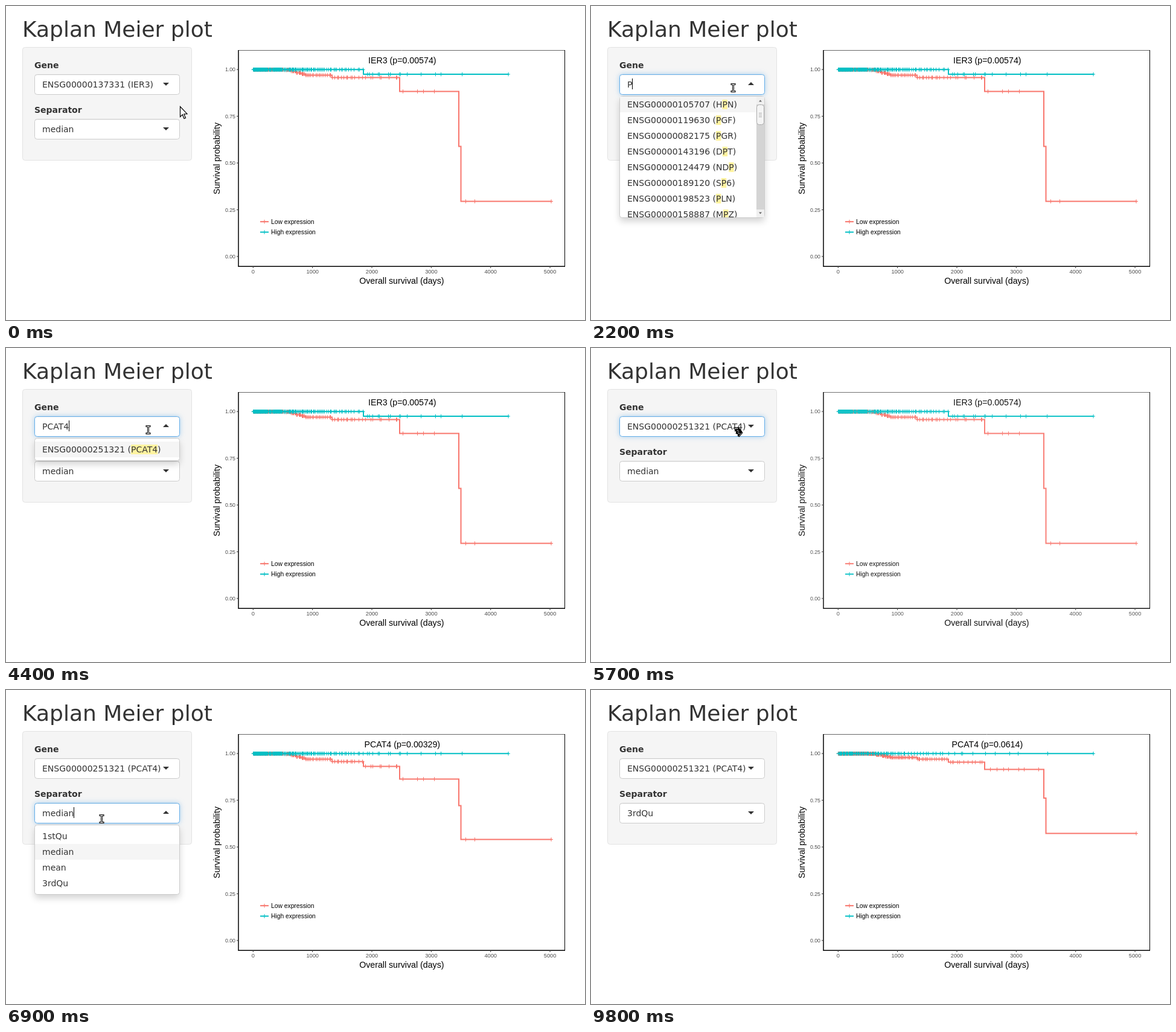
An HTML page with a canvas for the animation above (10 s loop, 959 by 520 pixels).

```html
<!DOCTYPE html>
<html lang="en">
<head>
<meta charset="utf-8">
<title>Kaplan Meier plot</title>
<style>
html, body { margin: 0; width: 100%; height: 100%; overflow: hidden; background: #fff; }
canvas { display: block; }
</style>
</head>
<body>
<canvas id="stage" width="959" height="520"></canvas>
<script>
const c = document.getElementById('stage').getContext('2d');
const UI = '"DejaVu Sans", sans-serif', CHART = '"Liberation Sans", sans-serif';
const RED = '#f8766d', TEAL = '#00bfc4';

const random = n => { const v = Math.sin(n * 12.9898) * 43758.5453; return v - Math.floor(v); };
const smooth = p => { p = Math.min(1, Math.max(0, p)); return p * p * (3 - 2 * p); };

function text(s, x, y, size, color = '#333', family = UI, align = 'left', weight = '') {
  c.font = `${weight} ${size}px ${family}`;
  c.fillStyle = color;
  c.textAlign = align;
  c.fillText(s, x, y);
}
function trace(points) {
  c.beginPath();
  points.forEach(([x, y]) => c.lineTo(x, y));
}
function line(points, color, width = 1, close = false) {
  trace(points);
  if (close) c.closePath();
  c.strokeStyle = color;
  c.lineWidth = width;
  c.stroke();
}
function polygon(points, fill) {
  trace(points);
  c.fillStyle = fill;
  c.fill();
}
function rect(x, y, w, h, fill) {
  c.fillStyle = fill;
  c.fillRect(x, y, w, h);
}
function box(x, y, w, h, fill, border, shadow, blur = 0, drop = 0) {
  c.beginPath();
  c.roundRect(x + .5, y + .5, w - 1, h - 1, 4);
  c.save();
  if (shadow) { c.shadowColor = shadow; c.shadowBlur = blur; c.shadowOffsetY = drop; }
  c.fillStyle = fill;
  c.fill();
  c.restore();
  c.strokeStyle = border;
  c.lineWidth = 1;
  c.stroke();
}

// Survival curves as [x, new y] steps; the low group first sags in small steps of a given depth.
const TOP = 105.3;
const sag = depth => [[460, .05], [472, .2], [481, .4], [488, .55], [496, .7], [540, 1]]
  .map(([x, part]) => [x, TOP + depth * part]);
const plots = [
  {
    title: 'IER3 (p=0.00574)',
    low: { steps: [...sag(13.2), [652, 141.5], [750, 232.5], [753.5, 323.5]], count: 130 },
    high: { steps: [[592, 113]], count: 140 }
  },
  {
    title: 'PCAT4 (p=0.00329)',
    low: { steps: [...sag(13.2), [592, 126.5], [652, 147.5], [750, 191.5], [753.5, 247.5]], count: 130 },
    high: { steps: [], count: 140 }
  },
  {
    title: 'PCAT4 (p=0.0614)',
    low: { steps: [...sag(9.2), [592, 119.5], [652, 131.5], [750, 179], [753.5, 237.5]], count: 180 },
    high: { steps: [], count: 90 }
  }
];

function plus(x, y, color) {
  line([[x - 3, y], [x + 3, y]], color);
  line([[x, y - 3.3], [x, y + 3.3]], color);
}
function curve({ steps, count }, color, end, seed) {
  let y = TOP;
  const path = [[409, y]];
  for (const [x, next] of steps) { path.push([x, y], [x, next]); y = next; }
  path.push([end, y]);
  line(path, color, 2);
  const levelAt = x => steps.reduce((level, s) => x >= s[0] ? s[1] : level, TOP);
  // Marks thin out exponentially with time.
  for (let i = 0; i < count; i++) {
    const x = Math.round(409 - 85 * Math.log(1 - (i + random(seed + i)) / count)) + .5;
    if (x < 780) plus(x, levelAt(x), color);
  }
  plus(end - 1, y, color);
}
function drawPlot({ title, low, high }, fade) {
  curve(low, RED, 904, 1);
  curve(high, TEAL, 833, 400);
  line([[385, 73.5], [926, 73.5]], '#666');
  line([[925.5, 73], [925.5, 431]], '#000');
  line([[385, 73], [385, 431.2], [926, 431.2]], '#000', 1.5);
  for (let i = 0; i < 5; i++) {
    const y = 414.8 - i * 77.4;
    line([[382, y], [385, y]], '#333');
    text((i / 4).toFixed(2), 380, y + 3.2, 8.8, '#4d4d4d', CHART, 'right');
  }
  for (let i = 0; i < 6; i++) {
    const x = 409.3 + i * 98.35;
    line([[x, 431], [x, 434]], '#333');
    text(i * 1000, x, 443, 9.2, '#4d4d4d', CHART, 'center');
  }
  text(title, 656.3, 95, 14.2, '#000', CHART, 'center');
  text('Overall survival (days)', 655.3, 460, 14.2, '#000', CHART, 'center');
  c.save();
  c.translate(354, 252.5);
  c.rotate(-Math.PI / 2);
  text('Survival probability', 0, 0, 14.2, '#000', CHART, 'center');
  c.restore();
  [['Low expression', RED, 357.2], ['High expression', TEAL, 374.5]].forEach(([label, color, y]) => {
    line([[421, y], [435, y]], color, 2);
    plus(428, y, color);
    text(label, 439, y + 3.8, 10.3, '#000', CHART);
  });
  if (fade) rect(340, 70, 600, 400, `rgba(255,255,255,${fade})`);
}

// Genes are written as NAME or NAME:id; a missing id is made up.
const genes = (`IER3:137331 FGR CFH TNMD SCYL3 FUCA2 GCLC NFYA KRIT1
  HPN:105707 PGF:119630 PGR:082175 DPT:143196 NDP:124479 SP6:189120 PLN:198523 MPZ:158887
  PC APC PCNT PCNA PCP4 PCK1 PCM1 PCK2 PCA3 PCAT1 PCAT2 PCAT4:251321 PCAT5 PCAT6 PCAT7 PCAT14 PCAT18`)
  .split(/\s+/).map((entry, i) => {
    const [name, id = 100000 + Math.floor(random(i) * 180000)] = entry.split(':');
    return { name, label: `ENSG00000${id} (${name})` };
  });
const label = name => genes.find(g => g.name === name).label;
const matches = query => genes.filter(g => g.name.includes(query)).slice(0, 8).map(g => g.label);
const separators = ['1stQu', 'median', 'mean', '3rdQu'];

const typed = t => 'PCAT4'.slice(0, t >= 4400 ? 5 : Math.min(4, Math.max(0, Math.floor((t - 1800) / 300))));
const keyTimes = [1100, 1800, 2100, 2400, 2700, 3100, 4400, 6700];
// Pointer moves: [start, end, from x, from y, to x, to y]
const moves = [
  [400, 1000, 288, 166, 235, 135], [5700, 6500, 235, 135, 158, 213],
  [7000, 7700, 158, 213, 120, 319], [8200, 8500, 120, 319, -20, 300]
];

function select(y, value, focus, open, caret) {
  box(47, y, 241, 34, '#fff', focus ? '#66afe9' : '#ccc', focus && 'rgba(102,175,233,.6)', 8);
  rect(49, y + 1, 237, 1, 'rgba(0,0,0,.04)');
  text(value, 60, y + 22, 14);
  if (caret) rect(Math.floor(60 + c.measureText(value).width), y + 7, 1, 18, '#000');
  const base = y + (open ? 18 : 14), tip = y + (open ? 13 : 19);
  polygon([[260, base], [270, base], [265, tip]], '#333');
}
function scrollbar() {
  rect(274, 150, 13, 200, '#d4d4d4');
  rect(274, 150, 13, 13, '#f0f0f0');
  rect(274, 337, 13, 13, '#f0f0f0');
  polygon([[278, 158.5], [283, 158.5], [280.5, 155.5]], '#666');
  polygon([[278, 341.5], [283, 341.5], [280.5, 344.5]], '#666');
  box(274, 163, 13, 34, '#f4f4f4', '#aaa');
  for (let y = 177; y < 185; y += 3) rect(278, y, 5, 1, '#aaa');
}
function dropdown(top, options, active, query) {
  const height = Math.min(200, options.length * 26 + 10), scrolls = height === 200;
  box(47, top, 241, height + 2, '#fff', '#ccc', 'rgba(0,0,0,.175)', 12, 6);
  c.save();
  c.beginPath();
  c.rect(48, top + 1, 239, height);
  c.clip();
  options.forEach((option, i) => {
    const y = top + (scrolls ? 1 : 6) + i * 26;
    if (i === active) rect(48, y, 239, 26, '#f5f5f5');
    if (query) {
      c.font = `14px ${UI}`;
      c.textAlign = 'left';
      const at = option.indexOf(query, option.indexOf('('));
      rect(60 + c.measureText(option.slice(0, at)).width, y + 5, c.measureText(query).width, 16, '#fff3a0');
    }
    text(option, 60, y + 18, 14);
  });
  if (scrolls) scrollbar();
  c.restore();
}

const pointers = {
  arrow() {
    const shape = [[0, 0], [0, 17], [3.8, 13.4], [6.5, 20], [9, 19], [6.3, 12.5], [11.5, 12.2]];
    polygon(shape, '#fff');
    line(shape, '#000', 1.2, true);
  },
  hand() {
    c.translate(0, -4);
    polygon([[0, 1], [2, 0], [9, 0], [13, 4], [16, 9], [10, 16], [7, 14], [8, 12], [4, 10], [5, 7], [2, 6], [3, 4]], '#000');
    line([[2, 2], [8, 2]], '#fff');
    for (let i = 0; i < 3; i++) line([[6 + i, 5 + i * 2.5], [9 + i, 5 + i * 2.5]], '#fff', .8);
    line([[10, 14], [14, 9]], '#fff', .8);
  },
  beam() {
    for (const [color, width, reach] of [['#000', 3, 4], ['#fff', 1, 3]]) {
      line([[-reach, -6], [reach, -6]], color, width);
      line([[-reach, 6], [reach, 6]], color, width);
      line([[0, -6], [0, 6]], color, width);
    }
  }
};

function draw(t) {
  const during = (from, to) => t >= from && t < to;
  const geneOpen = during(1100, 5200), sepOpen = during(6800, 7900);
  const sinceKey = t - (keyTimes.filter(k => t >= k).pop() || 0);
  const caret = Math.floor(sinceKey / 500) % 2 === 0;
  const [start, end, x0, y0, x1, y1] = moves.filter((m, i) => !i || t >= m[0]).pop();
  const p = smooth((t - start) / (end - start));
  const x = x0 + (x1 - x0) * p, y = y0 + (y1 - y0) * p;

  rect(0, 0, 959, 520, '#fff');
  text('Kaplan Meier plot', 27, 51, 36);
  box(27, 68, 281, 188, '#f5f5f5', '#e3e3e3');
  text('Gene', 47, 103, 14, '#333', UI, 'left', 'bold');
  text('Separator', 47, 177, 14, '#333', UI, 'left', 'bold');

  const version = t < 5900 ? 0 : t < 8700 ? 1 : 2;
  const fadeStart = [5650, 8450, Infinity][version];
  drawPlot(plots[version], .7 * smooth((t - fadeStart) / 250));

  const value = t < 1800 ? label('IER3') : geneOpen ? typed(t) : label('PCAT4');
  select(113, value, during(1100, 6800), geneOpen, geneOpen && caret);
  select(187, separators[t < 7900 ? 1 : 3], during(6800, 9800), sepOpen, sepOpen && caret);
  if (geneOpen) {
    // Results follow each keystroke a moment later.
    const query = typed(t >= 4400 ? t : t - 100);
    const options = matches(query);
    dropdown(149, t >= 1800 && !query ? options.slice(1).concat(label('KRIT1')) : options, 0, query);
  }
  if (sepOpen) dropdown(223, separators, y < 229 ? 1 : Math.floor((y - 229) / 26));

  const overGene = x < 288 && y >= 113 && y <= 148, overSep = x < 288 && y >= 187 && y <= 221;
  const kind = overGene && geneOpen || overSep && t >= 6500 ? 'beam'
    : overGene || overSep || sepOpen && y > 223 ? 'hand' : 'arrow';
  c.save();
  c.translate(Math.round(x) + .5, Math.round(y) + .5);
  pointers[kind]();
  c.restore();
}

const began = performance.now();
function tick() {
  const t = (performance.now() - began) % 10000;
  draw(Math.floor(t / 100) * 100);
  requestAnimationFrame(tick);
}
tick();
</script>
</body>
</html>
```
